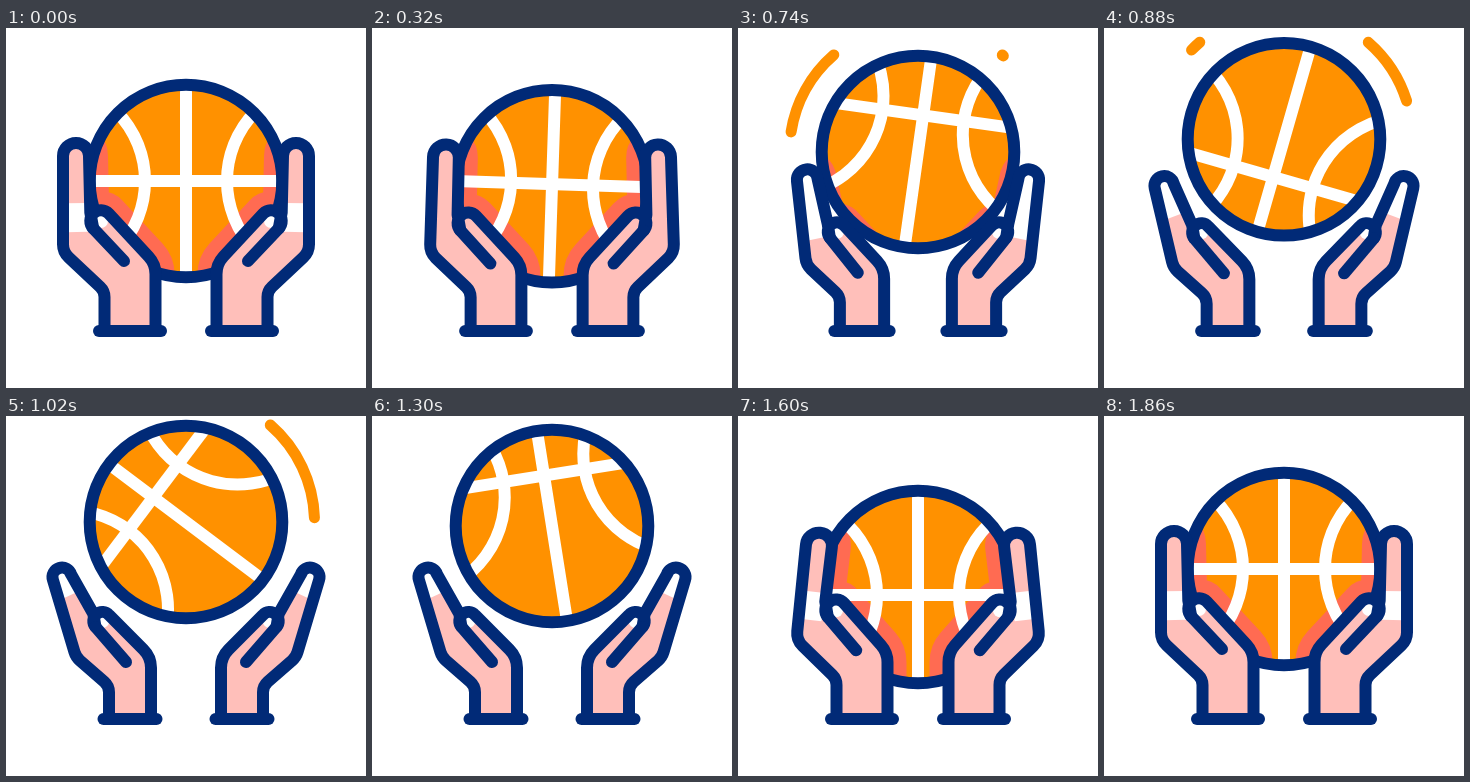
An HTML page with a canvas for the animation above (2200 ms loop, 360 px wide and 360 px high).

```html
<!DOCTYPE html>
<html lang="en">
<head>
<meta charset="utf-8">
<title>Basketball toss</title>
<style>
html, body { margin: 0; width: 100%; height: 100%; overflow: hidden; background: #fff; }
canvas { display: block; }
</style>
</head>
<body>
<canvas id="stage" width="360" height="360"></canvas>
<script>
const ctx = document.getElementById('stage').getContext('2d');
const { sin, cos, PI } = Math;
const LOOP = 2200, STEP = 20, BALL_R = 96.3, STREAK_R = 128.5;
const NAVY = '#012a77', ORANGE = '#ff9100', RED = '#ff6b52', PINK = '#ffbfba', WHITE = '#fff';

// Key poses: rest, crouch, throw, apex, hang, catch, rest
// spin in degrees, slide = seam offset, tilt = finger lean, open and sink shape the hand
const keys = [
  { at: 220, y: 153, spin: 0, slide: 0, open: 0, tilt: 0, sink: 0 },
  { at: 560, y: 178, spin: 21, slide: 17, open: .25, tilt: .155, sink: .9 },
  { at: 740, y: 124, spin: 368, slide: 37, open: .75, tilt: -.11, sink: .9 },
  { at: 1020, y: 106, spin: 667, slide: 41, open: 1, tilt: -.29, sink: 1 },
  { at: 1300, y: 110, spin: 711, slide: 51, open: 1, tilt: -.29, sink: 1 },
  { at: 1600, y: 171, spin: 720, slide: -8, open: 0, tilt: .1, sink: .1 },
  { at: 1840, y: 153, spin: 720, slide: 0, open: 0, tilt: 0, sink: 0 },
];

// Monotone cubic through the keys, flat at turning points and ends
function valueAt(name, t) {
  const last = keys.length - 1;
  if (t <= keys[0].at) return keys[0][name];
  if (t >= keys[last].at) return keys[last][name];
  const i = keys.findIndex(k => k.at > t) - 1;
  const slope = j => (keys[j + 1][name] - keys[j][name]) / (keys[j + 1].at - keys[j].at);
  const tangent = j => {
    if (j === 0 || j === last) return 0;
    const a = slope(j - 1), b = slope(j);
    return a * b > 0 ? 2 * a * b / (a + b) : 0;
  };
  const span = keys[i + 1].at - keys[i].at;
  const u = (t - keys[i].at) / span, v = 1 - u;
  return keys[i][name] * (1 + 2 * u) * v * v + keys[i + 1][name] * u * u * (1 + 2 * v)
    + span * (tangent(i) * u * v * v - tangent(i + 1) * u * u * v);
}

const progress = (t, from, to) => Math.min(1, Math.max(0, (t - from) / (to - from)));
const easeOut = u => 1 - (1 - u) ** 2;

function stroke(path, color, width, cap = 'round') {
  ctx.strokeStyle = color;
  ctx.lineWidth = width;
  ctx.lineCap = cap;
  ctx.lineJoin = 'round';
  ctx.stroke(path);
}

function fill(path, color) {
  ctx.fillStyle = color;
  ctx.fill(path);
}

function line(x1, y1, x2, y2) {
  const p = new Path2D();
  p.moveTo(x1, y1);
  p.lineTo(x2, y2);
  return p;
}

function circle(x, y, r) {
  const p = new Path2D();
  p.arc(x, y, r, 0, 2 * PI);
  return p;
}

// Left hand; the right one is its mirror image
function buildHand(open, tilt, sink) {
  const half = 25.5 - 4.5 * open, left = 124 - half, right = 124 + half;
  const knuckle = { x: 57 + 17 * open + 14 * tilt, y: 224 + 17 * open };
  const r = 13 - 3.5 * open, length = 96 - 15.5 * open;
  const edge = { x: knuckle.x + length * sin(tilt), y: knuckle.y - length * cos(tilt) };
  const tip = { x: edge.x + r * cos(tilt), y: edge.y + r * sin(tilt) };
  const thumb = { x: 95 + 30 * tilt + 10 * open, y: 193 + 12 * sink, r: 10.7 - 1.7 * open };
  const crease = { x: 118 + 2 * sink, y: 233 + 13 * sink };
  const dx = crease.x - thumb.x, dy = crease.y - thumb.y;
  const aim = Math.atan2(dy, dx) - Math.asin(thumb.r / Math.hypot(dx, dy));

  const outline = new Path2D();
  outline.moveTo(left, 303);
  outline.arcTo(left, 263 + 7 * open, knuckle.x, knuckle.y, 14);
  outline.arcTo(knuckle.x, knuckle.y, edge.x, edge.y, 18);
  outline.arc(tip.x, tip.y, r, tilt + PI, tilt + 2 * PI);
  outline.lineTo(thumb.x - thumb.r, thumb.y - thumb.r * .8);
  outline.arc(thumb.x, thumb.y, thumb.r, aim + PI / 2, aim + 1.5 * PI);
  outline.arcTo(right, 236 + 5 * sink, right, 303, 26);
  outline.lineTo(right, 303);

  // White light covers the open fingertip, or a band near the palm at rest
  const shine = open > .6 ? [-.3, 2.7 - 2.4 * open] : sink < .15 ? [.62, 1] : null;
  const along = u => [tip.x + (knuckle.x + 14 - tip.x) * u, tip.y + (knuckle.y - 20 - tip.y) * u];
  return {
    outline,
    crease: line(thumb.x - thumb.r * sin(aim), thumb.y + thumb.r * cos(aim), crease.x, crease.y),
    base: line(left - 5.5, 303, right + 5.5, 303),
    lights: shine && { band: line(...along(shine[0]), ...along(shine[1])), thumb: circle(thumb.x, thumb.y, 7) },
  };
}

function drawHand({ outline, crease, base, lights }) {
  fill(outline, PINK);
  if (lights) {
    ctx.save();
    ctx.clip(outline);
    stroke(lights.band, WHITE, 22, 'butt');
    fill(lights.thumb, WHITE);
    ctx.restore();
  }
  for (const path of [outline, crease, base]) stroke(path, NAVY, 12);
}

function bothSides(draw) {
  draw();
  ctx.save();
  ctx.translate(360, 0);
  ctx.scale(-1, 1);
  draw();
  ctx.restore();
}

function drawBall(y, spin, slide, hand) {
  const ball = circle(180, y, BALL_R);
  fill(ball, ORANGE);
  ctx.save();
  ctx.clip(ball);
  bothSides(() => stroke(hand.outline, RED, 38));
  ctx.translate(180, y);
  ctx.rotate(spin * PI / 180);
  ctx.translate(0, -slide);
  const seams = [line(-200, 0, 200, 0), line(0, -200, 0, 200), circle(-140, 0, 99), circle(140, 0, 99)];
  for (const seam of seams) stroke(seam, WHITE, 12);
  ctx.restore();
  stroke(ball, NAVY, 12);
}

// Streak around the ball, angles in degrees
function drawStreak(y, start, sweep, head, tail) {
  if (head <= 0 || tail >= 1) return;
  const angle = u => (start + sweep * u) * PI / 180;
  const p = new Path2D();
  p.arc(180, y, STREAK_R, angle(tail), angle(head) + .001);
  stroke(p, ORANGE, 11);
}

function render(t) {
  const get = name => valueAt(name, t);
  const hand = buildHand(get('open'), get('tilt'), get('sink'));
  const y = get('y');
  ctx.clearRect(0, 0, 360, 360);
  drawStreak(y, 179, 50, progress(t, 530, 720), progress(t, 700, 900));
  drawStreak(y, -49, 49, easeOut(progress(t, 738, 1090)), progress(t, 1020, 1220));
  drawBall(y, get('spin'), get('slide'), hand);
  bothSides(() => drawHand(hand));
}

const begin = performance.now();
function tick() {
  const t = (performance.now() - begin) % LOOP;
  render(Math.floor(t / STEP) * STEP);
  requestAnimationFrame(tick);
}
tick();
</script>
</body>
</html>
```
